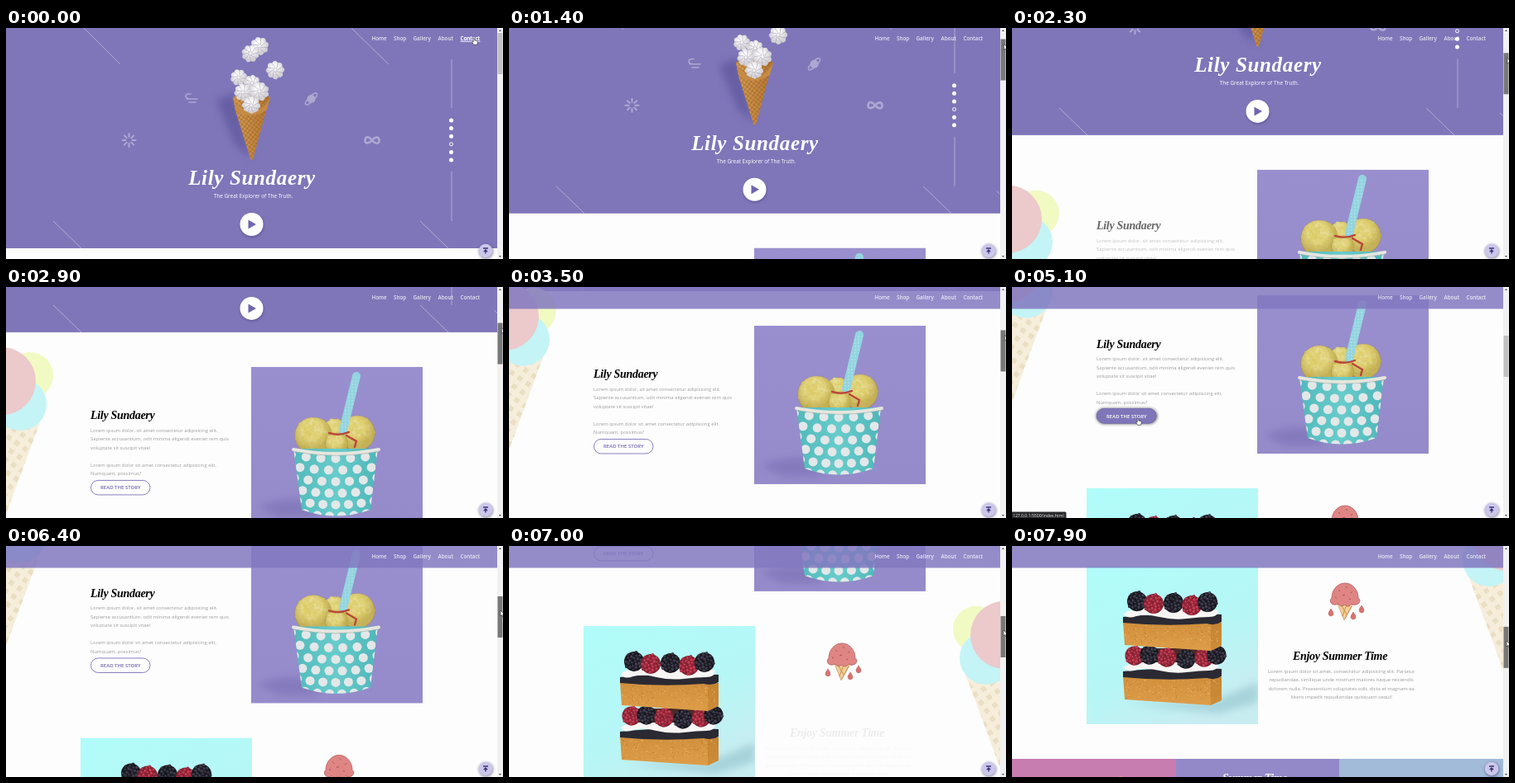
An HTML page for the animation above (8000 ms loop, 600 by 280 pixels).

```html
<!DOCTYPE html>
<html lang="en">
<head>
<meta charset="utf-8">
<title>Lily Sundaery</title>
<style>
html, body { margin: 0; width: 100%; height: 100%; overflow: hidden; background: #fdfdfd; }
svg { display: block; width: 600px; height: 280px; }
text { font-family: 'Open Sans', 'Noto Sans', sans-serif; font-size: 5.92px; }
.head { font: italic bold 14px 'Liberation Serif', 'Times New Roman', serif; letter-spacing: -.3px; }
.title { font: italic bold 25px 'Liberation Serif', 'Times New Roman', serif; letter-spacing: .65px; }
.nav text { font-size: 6.3px; font-weight: 600; fill: #fff; }
.mid { text-anchor: middle; }
.copy { fill: #9c9c9c; }
.thin { stroke: #fff; stroke-opacity: .38; fill: none; }
.icon { stroke: #fff; stroke-opacity: .36; fill: none; stroke-width: 2; stroke-linecap: round; }
</style>
</head>
<body>
<svg id="stage" viewBox="0 0 600 280"></svg>
<script>
const LOOP = 8000;
let seed = 7;
const rnd = () => (seed = seed * 16807 % 2147483647) / 2147483647;
const range = (n, f) => Array.from({ length: n }, (_, i) => f(i)).join('');

const circle = (x, y, r, a = '') => `<circle cx="${x.toFixed(1)}" cy="${y.toFixed(1)}" r="${r}" ${a}/>`;
const rect = (x, y, w, h, a = '') => `<rect x="${x}" y="${y}" width="${w}" height="${h}" ${a}/>`;
const path = (d, a = '') => `<path d="${d}" ${a}/>`;
const text = (x, y, s, a = '') => `<text x="${x}" y="${y}" ${a}>${s}</text>`;
const lines = (x, y, list, a) => list.map((s, i) => text(x, y + i * 10.5, s, a)).join('');
const fill = c => `fill="${c}"`;

// n spots spread evenly over a disc
const spread = (n, r, f) => range(n, i => {
  const d = r * Math.sqrt((i + .5) / n), a = i * 2.4;
  return f(d * Math.cos(a), d * Math.sin(a));
});

const defs = `<defs>
  <radialGradient id="cream" cx=".42" cy=".35"><stop offset=".2" stop-color="#fff"/><stop offset="1" stop-color="#d3d0d6"/></radialGradient>
  <radialGradient id="shade" cx=".45" cy=".35"><stop offset=".5" stop-color="#a88f35" stop-opacity="0"/><stop offset="1" stop-color="#a88f35" stop-opacity=".5"/></radialGradient>
  <linearGradient id="waffle"><stop stop-color="#d9a055"/><stop offset="1" stop-color="#b5752f"/></linearGradient>
  <linearGradient id="lilac" x2="0" y2="1"><stop stop-color="#998fcf"/><stop offset="1" stop-color="#958bca"/></linearGradient>
  <linearGradient id="aqua" x2=".6" y2="1"><stop stop-color="#b0fcfa"/><stop offset=".6" stop-color="#b6f7f6"/><stop offset="1" stop-color="#c8edf1"/></linearGradient>
  <linearGradient id="teal"><stop stop-color="#52b9bb"/><stop offset=".5" stop-color="#68cccb"/><stop offset="1" stop-color="#4fb6b9"/></linearGradient>
  <linearGradient id="sponge" x2="0" y2="1"><stop stop-color="#d18f3c"/><stop offset="1" stop-color="#dd9d48"/></linearGradient>
  <pattern id="grid" width="4" height="4" patternUnits="userSpaceOnUse" patternTransform="rotate(38)"><path d="M0 0H4M0 0V4" stroke="#93602a" stroke-width="1.1"/></pattern>
  <pattern id="checks" width="12" height="12" patternUnits="userSpaceOnUse" patternTransform="rotate(35)"><rect x="3" y="3" width="6" height="6" fill="#eadec3"/></pattern>
  <pattern id="spots" width="4" height="4" patternUnits="userSpaceOnUse"><circle cx="2" cy="2" r=".7" fill="#c9eef1"/></pattern>
  <clipPath id="cup"><path d="M347 120L357 194Q398 209 440 194L449 120Z"/></clipPath>
  <clipPath id="view"><rect x="90" y="543" width="207" height="192"/></clipPath>
  <filter id="soft" x="-50%" y="-50%" width="200%" height="200%"><feGaussianBlur stdDeviation="5"/></filter>
  <filter id="glow" x="-30%" y="-50%" width="160%" height="200%"><feGaussianBlur stdDeviation="1.5"/></filter>
</defs>`;

function meringue(x, y, r, turn) {
  const at = (a, d) => `${(r * d * Math.cos(a)).toFixed(1)} ${(r * d * Math.sin(a)).toFixed(1)}`;
  const step = Math.PI / 4;
  const edge = 'M' + at(0, .86) + range(8, i => `Q${at((i + .5) * step, 1.25)} ${at((i + 1) * step, .86)}`);
  const folds = range(8, i => `M${at(i * step, .86)}Q${at(i * step + .1, .45)} ${at(i * step + 1, .15)}`);
  return `<g transform="translate(${x} ${y}) rotate(${turn})">${path(edge, fill('url(#cream)'))}
    ${path(folds, 'fill="none" stroke="#aaa6b2" stroke-width=".8" stroke-opacity=".75"')}</g>`;
}

function hero() {
  const diagonals = 'M94 0L138 44M417 0L462 44M57 234L91 267M500 234L534 267';
  const spokes = range(8, i => {
    const c = Math.cos(i * Math.PI / 4), s = Math.sin(i * Math.PI / 4);
    return `M${148.5 + 4 * c} ${136 + 4 * s}L${148.5 + 8 * c} ${136 + 8 * s}`;
  });
  const puffs = [[306, 22, 11, 10], [295, 31, 10.5, 40], [325, 51, 11, 20], [281, 60, 10, 5],
    [297, 67, 10, 30], [286, 78, 10.5, 15], [306, 77, 11.5, 0], [296, 94, 11, 25]];
  const cone = 'M274 84Q296 72 319 84Q317 92 314 100L298.500 158Q297 162 295 158L277 100Z';
  return rect(0, 0, 593, 267, fill('#7f76b9')) +
    path(diagonals + 'M538 38V97M538 174V234', 'class="thin"') +
    path('M589 240L593 244', 'class="thin" id="tick"') +
    path(spokes, 'class="icon"') +
    path('M442 136C438 131 434 131 433.500 136S439 140 442 136S450 131 450.500 136S446 141 442 136', 'class="icon" style="stroke-width:2.6"') +
    `<g opacity=".36">${circle(368.5, 86, 5, fill('#fff'))}<ellipse cx="368.5" cy="86" rx="9.5" ry="3" transform="rotate(-45 368.5 86)" fill="none" stroke="#fff" stroke-width="1.4"/></g>` +
    path('M218 86H231M221 90H229M223 80Q217 79 217 83Q218 86 222 86', 'class="icon" style="stroke-width:1.6"') +
    path('M254 88L276 78L296 158L276 140Z', 'fill="#3f3782" opacity=".38" filter="url(#soft)"') +
    path(cone, fill('url(#waffle)')) + path(cone, fill('url(#grid)')) +
    puffs.map(p => meringue(...p)).join('') +
    path('M274 83Q279 98 297 104Q314 97 319 83L315 99Q297 112 278 101Z', fill('#c58b45')) +
    text(297, 190, 'Lily Sundaery', 'class="title mid" fill="#fff"') +
    text(298.5, 206, 'The Great Explorer of The Truth.', 'class="mid" fill="#fff" style="font-size:6.4px"') +
    circle(297, 239.5, 14, 'fill="#3d3675" opacity=".5" filter="url(#glow)"') +
    circle(296.5, 238, 14, fill('#fff')) + path('M292.500 232.500L302 238L292.500 243.500Z', fill('#6f66b0')) +
    range(6, i => circle(537.5, 112 + i * 9.6, i === 3 ? 2 : 2.5, i === 3 ? 'fill="none" stroke="#fff"' : fill('#fff')));
}

function scoop(x, y, r) {
  return circle(x, y, r, fill('#e0d073')) +
    spread(90, r * .95, (dx, dy) => circle(x + dx, y + dy, 1 + rnd() * 1.4, fill(`hsl(52 62% ${63 + rnd() * 11}%)`))) +
    circle(x, y, r + 1, fill('url(#shade)'));
}

function tub() {
  // rows sag like the rim and narrow with the cup
  const dots = range(6, j => range(7, i => {
    const u = (i - 3 + j % 2 / 2) / 2.8, y = 128 + j * 14;
    return circle(398 + u * (50 - j * 1.7), y + 4 * (1 - u * u), 5.5, fill('#e3e7e8'));
  }));
  return `<g transform="translate(0 288)">
    ${rect(296, 21, 207, 192, fill('url(#lilac)'))}
    ${path('M304 190Q330 180 360 182L380 203H330Z', 'fill="#5d529c" opacity=".3" filter="url(#soft)"')}
    ${scoop(397, 99, 15)}${scoop(371, 104, 22)}${scoop(424, 101, 21)}
    ${path('M423 32L407 98', 'stroke="#93d4e0" stroke-width="10" stroke-linecap="round"')}
    ${path('M419 32L403 98L411 99L427 34Z', fill('url(#spots)'))}
    ${scoop(399, 114, 13)}
    ${path('M390 101Q402 105 414 100M411 104L423 111L421 118', 'stroke="#b9473a" stroke-width="2.4" fill="none" stroke-linecap="round"')}
    ${path('M347 120L357 194Q398 209 440 194L449 120Z', fill('url(#teal)'))}
    <g clip-path="url(#cup)">${dots}</g>
    ${path('M347 121Q398 131 450 121', 'fill="none" stroke="#e6e6de" stroke-width="4" stroke-linecap="round"')}
    ${path('M347 123.500Q398 133.500 450 123.500', 'fill="none" stroke="#a9b8b4" stroke-width=".7"')}
  </g>`;
}

function berry(x, y, r, dark) {
  const hue = dark ? 245 : 350, sat = dark ? 12 : 58, base = dark ? 10 : 32;
  return circle(x, y, r, fill(`hsl(${hue} ${sat}% ${base}%)`)) + spread(24, r * .95, (dx, dy) =>
    circle(x + dx, y + dy, 1.9, fill(`hsl(${hue} ${sat}% ${base + 4 + rnd() * 12}%)`)) +
    circle(x + dx - .5, y + dy - .6, .6, fill(`hsl(${hue} ${sat}% ${base + 32}%)`)));
}

function slab(y) {
  return path(`M134 ${y}L253 ${y + 2}V${y + 30}L240 ${y + 36}L136 ${y + 29}Z`, fill('url(#sponge)')) +
    path(`M240 ${y + 5}L253 ${y + 2}V${y + 30}L240 ${y + 36}Z`, 'fill="#b97729" opacity=".45"') +
    range(150, () => circle(137 + rnd() * 113, y + 5 + rnd() * 23, .6, fill(rnd() < .5 ? '#e9b769' : '#bd7c30'))) +
    path(`M134 ${y + 2}V${y - 5}Q190 ${y - 11} 253 ${y - 8}V${y + 1}Q245 ${y + 6} 235 ${y + 3}Q185 ${y + 7} 134 ${y + 2}Z`, fill('#2b2a33'));
}

function cake() {
  const cream = y => path(`M135 ${y}Q138 ${y - 9} 190 ${y - 8}T249 ${y - 5}Q249 ${y + 3} 238 ${y + 3}T211 ${y + 5}T178 ${y + 3}T150 ${y + 2}Q140 ${y + 6} 135 ${y}Z`, fill('#f7f6f4'));
  const row = (list, dark, r) => list.map(([x, y], i) => berry(x, y, r, (i % 2 === 0) === dark)).join('');
  return `<g clip-path="url(#view)"><g transform="translate(0 446)">
    ${rect(90, 97, 207, 192, fill('url(#aqua)'))}
    ${path('M240 262L297 238V262L250 276L140 264Z', 'fill="#86b9c4" opacity=".5" filter="url(#soft)"')}
    ${slab(230)}${cream(221)}${path('M140 197H248V214H142Z', fill('#4b2a25'))}
    ${row([[148, 206], [166, 205], [187, 208], [210, 210], [232, 208], [247, 205]], false, 11.5)}
    ${slab(164)}${cream(156)}
    ${row([[151, 140], [171, 143], [195, 142], [217, 145], [236, 141]], true, 12)}
  </g></g>`;
}

function cornet() {
  const drop = (x, y) => path(`M${x} ${y - 5}Q${x + 6} ${y + 3} ${x} ${y + 4}Q${x - 6} ${y + 3} ${x} ${y - 5}Z`, 'fill="#d9716f" stroke="#a8504f" stroke-width=".5"');
  return `<g transform="translate(402 564)">
    ${path('M-9 25L-1 45L10 25Z', 'fill="#f3cf97" stroke="#b98550" stroke-width=".6"')}
    ${path('M-5 26L2 38M2 26L-3 40M8 28L0 43', 'stroke="#c98d4f"')}
    ${path('M-16 18A16 18 0 0 1 16 18Q20 21 16 25Q11 28 8 25Q4 31 0 26Q-5 30 -8 25Q-14 28 -17 24Q-19 20 -16 18Z', 'fill="#df8685" stroke="#b35f5e" stroke-width=".8"')}
    ${path('M-8 8L-6 10M1 4L3 6M7 12L9 10M-3 15L0 14M-12 17L-10 18M5 19L7 20', 'stroke="#a94f55"')}
    ${drop(-17, 36)}${drop(10, 40)}${drop(20, 32)}</g>`;
}

const wafer = 'M48 31L-2 167L-75 31Z';
const sundae = path(wafer, fill('#f6eedb')) + path(wafer, fill('url(#checks)')) +
  circle(29, -7, 28, fill('#f1fac2')) + circle(17, 28, 32, fill('#c4f4f6')) + circle(-5, 0, 41, fill('#ecc9cb'));

const button = (bg, ink) => rect(102.5, 446.5, 71.5, 17.5, `rx="8.75" fill="${bg}" stroke="#7a71b8" stroke-width=".9"`) +
  text(138.3, 457.5, 'READ THE STORY', `class="mid" font-weight="600" style="font-size:6px" fill="${ink}"`);

const menu = [['Home', 441.5], ['Shop', 468], ['Gallery', 491.5], ['About', 521.5], ['Contact', 548.5]];

stage.innerHTML = defs + `
<g id="page">
  ${hero()}
  ${tub()}${cake()}
  <g id="story">
    ${text(102, 372.5, 'Lily Sundaery', 'class="head"')}
    ${lines(102, 388, ['Lorem ipsum dolor, sit amet consectetur adipisicing elit.', 'Sapiente accusantium, odit minima eligendi eveniet rem quis', 'voluptate sit suscipit vitae!', '', 'Lorem ipsum dolor sit amet consectetur adipisicing elit.', 'Numquam, possimus?'], 'class="copy"')}
    ${button('#fdfdfd', '#6f66b0')}
    <g id="hover">${rect(101, 445.5, 75, 20, 'rx="10" fill="#444" opacity=".6" filter="url(#glow)"')}${button('#7f76b9', '#fff')}</g>
  </g>
  ${cornet()}
  <g id="summer">
    ${text(396, 656.5, 'Enjoy Summer Time', 'class="head mid"')}
    ${lines(397.7, 672.5, ['Lorem ipsum dolor sit amet, consectetur adipisicing elit. Pariatur', 'repudiandae, similique unde nostrum maiores itaque reiciendis', 'dolorem nulla. Praesentium voluptates odit, dicta et magnam ea', 'libero impedit repudiandae quisquam sequi!'], 'class="copy mid"')}
  </g>
  ${rect(0, 777, 198, 60, fill('#c77db0'))}${rect(198, 777, 197, 60, fill('#9389c8'))}${rect(395, 777, 198, 60, fill('#a1bbd9'))}
  ${circle(131, 801, 3, fill('#e8a07c'))}${text(254, 805, 'Summer Time', 'class="head" fill="#fff"')}
</g>
<g id="left">${sundae}</g>
<g id="right">${sundae}</g>
<rect id="bar" width="593" height="26.500" fill="#8278c0" fill-opacity=".85"/>
<g class="nav">${menu.map(([s, x]) => text(x, 14.6, s, 'fill-opacity=".8"')).join('')}
  <g id="active">${text(548.5, 14.6, 'Contact')}${rect(548.5, 15.8, 24, .9, fill('#fff'))}</g></g>
${circle(579.5, 271, 9, 'fill="#2d2758" opacity=".45" filter="url(#glow)"')}${circle(579, 270, 8.3, fill('#cbc7ea'))}
${path('M576 267H582M579 273.500V269', 'stroke="#3b3478" stroke-width="1.300"')}${path('M576 271.200L579 268L582 271.200Z', fill('#3b3478'))}
<g id="status">${rect(-2, 272.5, 67.5, 10, 'rx="1.500" fill="#2a2a2c"')}${text(1, 278.6, '127.0.0.1:5500/index.html', 'fill="#e4e4e4" style="font-size:5.1px"')}</g>
${rect(593, 0, 7, 280, fill('#f1f1f1'))}${path('M595 4L596.500 2L598 4ZM595 276L596.500 278L598 276Z', fill('#505050'))}
<rect id="thumb" x="593.500" width="6" height="50"/>
<g id="cursor" fill="#fff" stroke="#222" stroke-width=".6">
  ${path('M0 0V7L1.700 5.500L2.800 8L3.900 7.500L2.900 5.100H5Z', 'id="arrow"')}
  ${path('M-.8 4V.5Q0 -.6 .8 .5V3L4 3.600Q4.600 4 4.300 6L3.500 8.300H-.2L-2.500 5Q-2.300 3.800 -.8 5Z', 'id="hand"')}
</g>`;

const el = id => document.getElementById(id);
const set = (id, name, value) => el(id).setAttribute(name, value);
const ramp = (t, a, b) => Math.min(1, Math.max(0, (t - a) / (b - a)));

// linear value between [time, value] points
function track(t, keys) {
  const i = keys.findIndex(k => k[0] > t);
  if (i < 0) return keys[keys.length - 1][1];
  if (!i) return keys[0][1];
  const [a, b] = [keys[i - 1], keys[i]];
  return a[1] + (b[1] - a[1]) * ramp(t, a[0], b[0]);
}

const scrollKeys = [[1000, 0], [2300, 137], [2900, 212], [3500, 262], [4000, 288], [4400, 299], [6350, 299], [7000, 446], [7400, 492], [7900, 519]];
const cursorX = [[150, 565], [750, 597], [2300, 598], [4000, 599], [4400, 598], [4650, 200], [4800, 152], [5500, 152], [6200, 597]];
const cursorY = [[150, 12], [750, 15], [1000, 15], [4400, 68], [4650, 150], [4800, 159], [5500, 159], [6200, 79]];

function reveal(id, p) {
  set(id, 'opacity', p);
  set(id, 'transform', `translate(0 ${22 * (1 - p)})`);
}

function draw(t) {
  const scroll = track(t, scrollKeys), thumbY = 6 + .177 * scroll;
  const first = t >= 1000 && t < 4400, second = t >= 6300;
  const hover = ramp(t, 4720, 4900) * (1 - ramp(t, 5520, 5700));
  set('page', 'transform', `translate(0 ${-scroll})`);
  set('left', 'transform', `translate(0 ${447 - 1.57 * scroll})`);
  set('right', 'transform', `translate(593 ${835 - 1.63 * scroll}) scale(-1 1)`);
  reveal('story', ramp(t, 1900, 2580));
  reveal('summer', ramp(t, 6960, 7600));
  set('tick', 'opacity', +(t >= 1000));
  set('bar', 'opacity', ramp(t, 3000, 3300));
  set('active', 'opacity', 1 - ramp(t, 250, 400));
  set('hover', 'opacity', hover);
  set('status', 'opacity', +(t >= 4800 && t < 5600));
  set('thumb', 'y', thumbY);
  set('thumb', 'fill', first || second ? '#787878' : '#c1c1c1');
  const y = first ? thumbY + 9 : second ? thumbY + 20 : track(t, cursorY);
  set('cursor', 'transform', `translate(${track(t, cursorX)} ${y - (first || second ? 3 : 0)})`);
  const pointing = t < 300 || (t > 4720 && t < 5540);
  set('hand', 'opacity', +pointing);
  set('arrow', 'opacity', +!pointing);
}

function tick(now) {
  draw(now % LOOP);
  requestAnimationFrame(tick);
}
draw(0);
requestAnimationFrame(tick);
</script>
</body>
</html>
```
